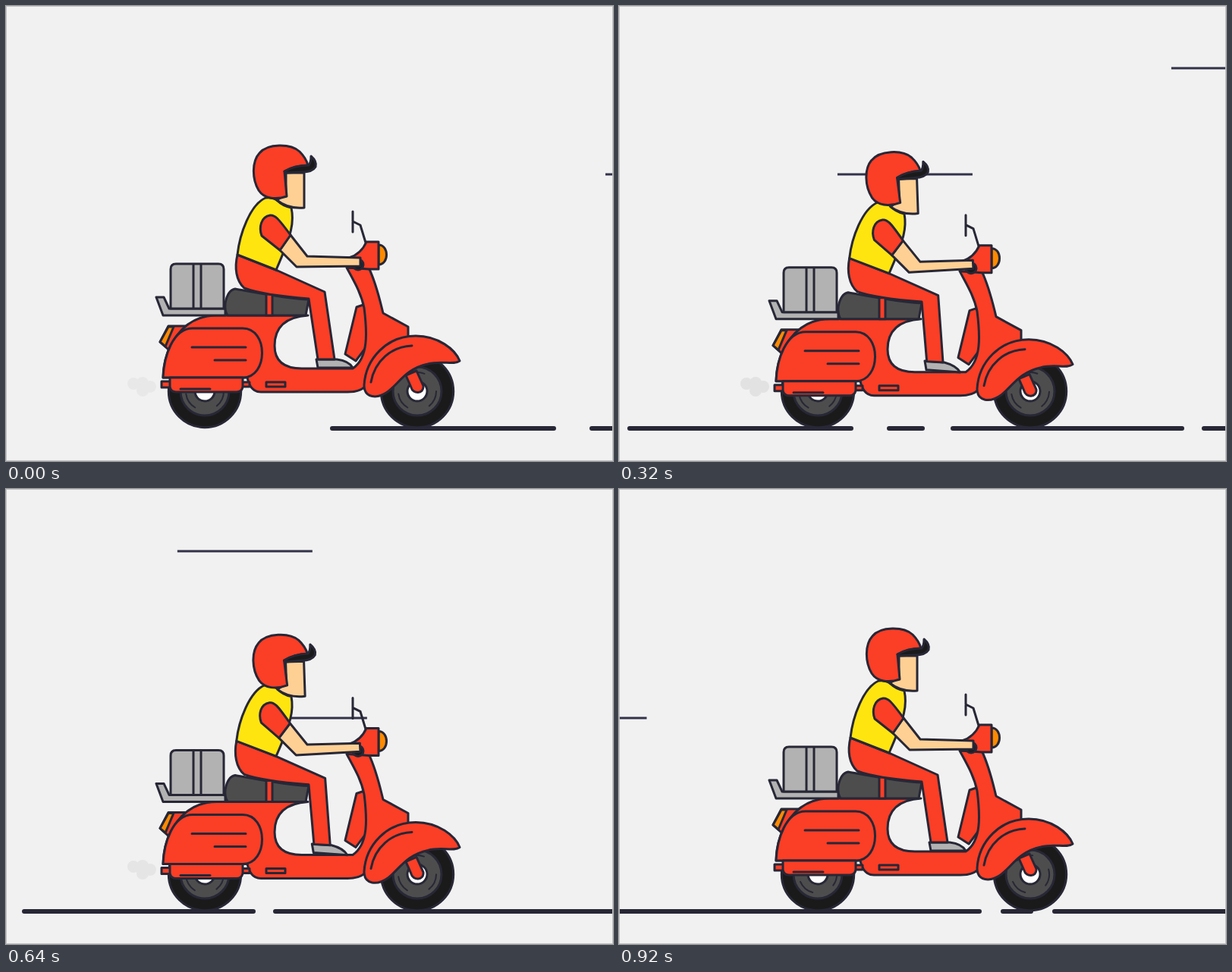
Animation, 800 px wide and 600 px high, one loop 0.96 s. Source, as an HTML page:

```html
<!DOCTYPE html>
<html lang="en">
<head>
<meta charset="utf-8">
<title>Scooter ride</title>
<style>
  html, body { margin: 0; width: 100%; height: 100%; overflow: hidden; background: #f1f1f1; }
  svg { display: block; width: 800px; height: 600px; }
  .ink { stroke: #272736; stroke-width: 3; stroke-linejoin: round; stroke-linecap: round; fill: none; }
  .red { fill: #fb3e26; }
  .grey { fill: #b2b2b2; }
  .dark { fill: #4d4d4d; }
  .black { fill: #1a1a1a; }
  .skin { fill: #ffd094; }
  .yellow { fill: #ffe50f; }
  .orange { fill: #ff8a00; }
  .white { fill: #fff; }
</style>
</head>
<body>
<svg viewBox="0 0 800 600">
  <defs>
    <g id="wheel">
      <circle class="black" r="47.7"/>
      <circle class="dark" r="32"/>
      <circle id="tread" r="25" stroke-width="2" stroke-dasharray="22 30.36"/>
      <circle class="white" r="13"/>
    </g>
  </defs>

  <path id="wind" stroke="#32324a" stroke-width="3"/>
  <path id="road" stroke="#272736" stroke-width="6" stroke-linecap="round"/>

  <g id="smoke" fill="#c9c9c9">
    <circle cx="168" cy="498" r="8"/>
    <circle cx="180" cy="497" r="8"/>
    <circle cx="190" cy="502" r="8"/>
    <circle cx="180" cy="507" r="8"/>
  </g>

  <g class="ink">
    <use href="#wheel" x="262" y="508"/>
    <use href="#wheel" x="542" y="508"/>

    <g id="bike">
      <path class="red" d="M527 487L534 503C536 512 551 512 550 501L541 481Z"/>
      <path class="red" d="M214 422H238L214 453L203 443Z"/>
      <path class="orange" d="M214 423H221L210 449L203 443Z"/>
      <path class="red" d="M474 393L462 397L447 459L461 468L482 440Z"/>
      <path class="red" d="M207 490C208 450 232 408 278 408H398C368 410 354 424 354 448C354 468 366 478 390 478H457C478 464 476 430 472 398C468 378 458 362 449 345H478C488 366 492 385 497 405L530 423V470L473 502Q466 509 450 509H336Q322 509 318 490Z"/>
      <path class="red" d="M207 490C208 462 220 425 246 425H312C346 425 346 490 312 490Z"/>
      <path d="M245 450H316M275 467H316"/>
      <path class="red" d="M205 495H218V503H205ZM310 496H321V502H310ZM343 496H368V502H343Z"/>
      <path class="red" d="M216 490H312V502Q311 509 304 509H224Q217 509 216 502Z"/>
      <path d="M230 505H269"/>
      <path class="grey" d="M198 384H208L215 399H289V408H207Z"/>
      <path class="grey" d="M217 399V347Q217 340 224 340H280Q287 340 287 347V399ZM247 340V399M257 340V399"/>
      <path class="dark" d="M289 392Q292 375 302 373C330 378 370 386 399 387L395 408H292Q288 402 289 392Z"/>
      <path class="red" d="M343 380H351V408H343Z"/>
      <path class="red" d="M472 500C474 465 502 435 540 435C570 435 592 453 598 468C590 474 574 467 556 472C528 478 519 496 504 508C489 519 472 517 472 500Z"/>
      <path d="M481 496C486 468 508 449 535 448"/>
      <path d="M457 271V298M457 284L467 289L474 312"/>
      <path class="orange" d="M491 315C505 315 505 341 491 341Z"/>
      <path class="red" d="M450 345L452 332Q468 327 475 311H491V347H478Z"/>
      <circle class="black" cx="464" cy="341" r="7"/>
    </g>

    <path id="foot" class="grey"/>
    <path id="leg" class="red"/>
    <path id="torso" class="yellow"/>
    <g id="head">
      <path class="skin" d="M369 220H393V266Q372 268 357 256L369 248Z"/>
      <path class="red" d="M370 251C355 256 340 254 333 243C324 228 324 205 334 194C345 181 375 181 387 192C393 198 396 203 398 210Q380 211 367 218Z"/>
      <path class="black" d="M367 218Q380 210 399 210Q402 206 402 198Q410 205 408 212Q404 219 390 219L368 220Z"/>
    </g>
    <path id="arm" class="skin"/>
    <path id="sleeve" class="red"/>
  </g>
  <rect x=".5" y=".5" width="799" height="599" fill="none" stroke="#c2c2c2"/>
</svg>
<script>
const LOOP = 960, STEP = 40;
const $ = id => document.getElementById(id);

// Each limb blends between its raised and its lowered outline.
const limbs = {
  foot: ['M409 466L436 466Q452 468 457 477L411 477Z',
         'M400 469L425 472Q440 477 446 486L402 481Z'],
  leg: ['M305 328L358 349L420 377L433 466L411 466L399 386C360 383 330 378 314 372C303 362 301 345 305 328Z',
        'M303 335L356 355L421 384L424 472L403 470L399 392C360 389 330 385 314 379C303 370 300 352 303 335Z'],
  torso: ['M305 328C308 300 322 262 342 253C350 252 356 255 358 257Q365 264 376 266C380 285 377 300 356 348Z',
          'M303 335C306 308 320 271 340 262C348 261 355 265 357 267Q364 275 376 278C379 295 376 310 356 355Z'],
  arm: ['M375 302L397 330L467 332L467 343L383 344L361 322Z',
        'M374 313L397 341L466 337L467 348L382 355L359 332Z'],
  sleeve: ['M337 303C333 292 336 278 348 276C354 275 358 279 375 302L361 322Z',
           'M336 311C332 300 335 287 347 285C353 284 357 288 374 313L359 332Z']
};

const winds = [[790, 222, 178], [1230, 82, 178], [1370, 302, 110]];
const road = [[428, 724], [770, 818], [854, 1160], [1185, 1673], [1700, 1741], [1768, 2100]];

function mix(from, to, k) {
  const ends = to.match(/\d+/g);
  let i = 0;
  return from.replace(/\d+/g, n => +n + (ends[i++] - n) * k);
}

function draw(t) {
  const falling = t < 480;
  const dip = falling ? t / 480 : Math.max(0, (920 - t) / 440);

  $('wind').setAttribute('d', winds.map(([x, y, w]) => `M${x - 1.569 * t} ${y}h${w}`).join(''));
  $('road').setAttribute('d', road.map(([a, b]) => `M${a + 2 - 1.3 * t} 557h${b - a - 4}`).join(''));
  $('smoke').setAttribute('opacity', falling ? .2 + .25 * dip : .45 * dip);
  $('bike').setAttribute('transform', `translate(0 ${7 * dip})`);
  $('head').setAttribute('transform', `translate(${-.5 * dip} ${13 * dip}) rotate(${-3 * dip} 360 222)`);
  $('tread').setAttribute('transform', `rotate(${t / LOOP * 360})`);
  for (const id in limbs) $(id).setAttribute('d', mix(...limbs[id], dip));
}

function tick() {
  draw(Math.floor(performance.now() % LOOP / STEP) * STEP);
  requestAnimationFrame(tick);
}
tick();
</script>
</body>
</html>
```
